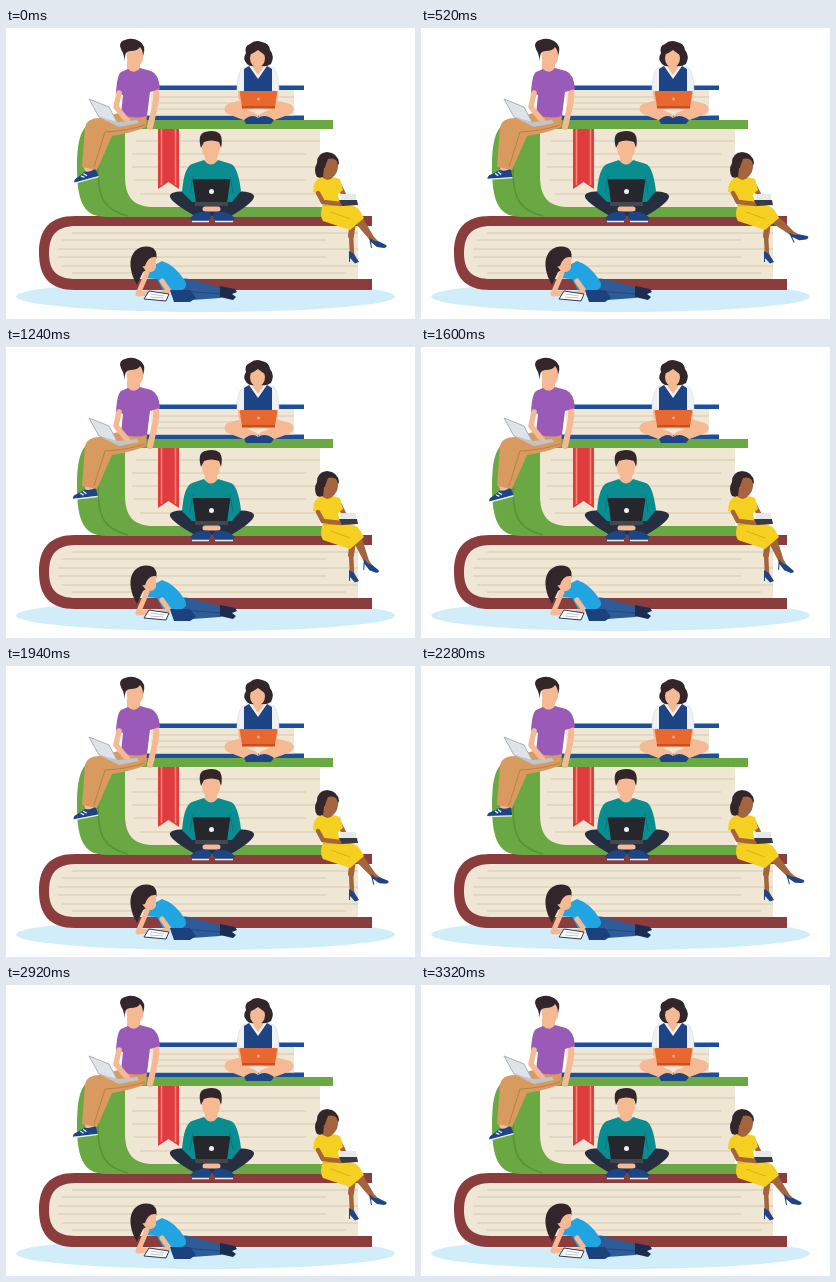
Write an HTML page that moves like this. It is 409 by 291 pixels and loops after 3340 ms.

```html
<!DOCTYPE html>
<html lang="en">
<head>
<meta charset="utf-8">
<title>Readers on a stack of books</title>
<style>
  html, body { margin: 0; width: 100%; height: 100%; overflow: hidden; background: #fff; }
  svg { display: block; width: 100vw; height: 100vh; }
  .skin { fill: #f5b994; }
  .hair { fill: #33262a; }
  .page { fill: #f0e6d4; }
  .rule { stroke: #ddd2bd; stroke-width: 1.6; fill: none; }
  .navy { fill: #1d4484; }
  .limb { fill: none; stroke-linecap: round; stroke-linejoin: round; }
  .light { stroke: #f5b994; }
  .brown { stroke: #a4643d; }
</style>
</head>
<body>
<svg viewBox="0 0 409 291">
  <ellipse cx="199.500" cy="268.500" rx="189.500" ry="15.500" fill="#d1edfa"/>

  <g id="bottom-book">
    <path fill="#8a3d3c" d="M366 188H69C44 188 33 201 33 225S44 262 69 262H366V251H340V198H366Z"/>
    <path class="page" d="M352 198H70C51 198 43 207 43 225S51 251 70 251H352Z"/>
    <path class="rule" d="M66 205H352M56 212H320M52 221H352M52 229H320M56 238H352M66 245H340"/>
  </g>

  <g id="middle-book">
    <path fill="#69a842" d="M327 92H98C78 92 71 104 71 140S79 189 101 189H327V179H300V101H327Z"/>
    <path fill="none" stroke="#579237" stroke-width="1.500" d="M108 94C96 97 92 108 92 140S99 182 122 188"/>
    <path class="page" d="M314 101H121Q119 102 119 106V148C119 169 127 179 148 179H314Z"/>
    <path class="rule" d="M130 113H314M126 126H300M126 139H314M128 152H300M134 166H314"/>
    <path fill="#e03c40" d="M152 101H173V161L162.500 154 152 161Z"/>
    <path stroke="#f28a72" stroke-width="1.500" d="M155.500 101V157M169.500 101V157"/>
  </g>

  <g id="top-book">
    <path fill="#1d4f98" d="M150 57.500H298V62H150ZM138 87.500H298V92H138Z"/>
    <path class="page" d="M145 62H288V87.500H145Z"/>
    <path class="rule" d="M152 69H288M152 75H276M152 81H288"/>
  </g>

  <g id="man-left">
    <path class="limb light" stroke-width="6" d="M150 58Q151 72 148 82L144 99"/>
    <g id="shoe">
      <path class="skin" d="M79 137H89L88 144 80 145Z"/>
      <path class="navy" d="M79 141.500Q85 144 90 140.500L91 149.500H66Q66 146 71 145Z"/>
      <path stroke="#e9eef5" stroke-width="1.300" d="M66 150H91M74 144.500L77 147M77 143L80 146"/>
    </g>
    <path fill="#d99a60" d="M141 87L140 99Q126 105 106 108L91 142 76 139 79 99Q81 90 94 90L116 84Z"/>
    <path fill="none" stroke="#bd7e48" d="M139 97Q121 103 99 104L88 139"/>
    <path class="skin" d="M121 33H134V44Q127 50 121 43Z"/>
    <path fill="#9a5bb8" d="M122 41Q128 47 134 40L145 43Q153 46 154 61L144 64 141 88Q128 92 115 86L117 67 110 65Q111 47 115 44Z"/>
    <path class="limb light" stroke-width="5.500" d="M113 65L110 79 119 90"/>
    <ellipse class="skin" cx="129" cy="27" rx="8.500" ry="12"/>
    <path class="hair" d="M119 33Q118 23 124 23 132 23 134 19 137 22 137 28 141 17 133 13 126 9 119 12 114 13 114 18 115 22 117 25Z"/>
    <path fill="#dfe3e8" stroke="#a9b0ba" d="M83 71L103 79 112 96 93 89Z"/>
    <path fill="#bfc5cd" d="M93 89L112 94 131 92 133 95 113 99Z"/>
    <path class="limb light" stroke-width="4" d="M117 89L122 92"/>
  </g>

  <g id="woman-top">
    <path class="limb light" stroke-width="11" d="M245 75L224 81 247 90M259 75L282 81 258 90"/>
    <path class="limb light" stroke-width="5" d="M234 58L235 70M270 58L269 70"/>
    <path class="navy" d="M238 92Q246 85 252 90 259 85 268 92L265 96H240Z"/>
    <path fill="#eef1f6" stroke="#d5dbe4" stroke-width=".6" d="M246 37H258L268 40Q273 46 273 63H264V72H240V63H231Q231 45 237 40Z"/>
    <path class="navy" d="M243 38L252 51 261 38 266 41V66H238V41Z"/>
    <path class="skin" d="M247 34H257V40L252 47 247 40Z"/>
    <path class="hair" d="M241 36Q236 31 240 25 238 18 244 16 249 11 256 14 263 15 264 22 269 28 265 36 259 40 252 37 245 40 241 36Z"/>
    <ellipse class="skin" cx="251.500" cy="30" rx="7.500" ry="9.500"/>
    <path class="hair" d="M243 27Q244 18 252 18 260 19 260 28 256 25 252 22 248 25 243 27Z"/>
    <path fill="#e9682f" d="M235 63H270Q272 63 271 66L269 79H236L234 66Q233 63 235 63Z"/>
    <path fill="#c94e20" d="M236 78H269V80.500H236Z"/>
    <circle cx="252.500" cy="71" r="1.500" fill="#f7a47d"/>
  </g>

  <g id="man-middle">
    <path fill="#262e40" d="M184 163Q162 163 164 169 166 175 189 188H225Q247 175 248 169 249 163 226 163Z"/>
    <path class="skin" d="M199 126H211V138L205 143 199 138Z"/>
    <path fill="#098d91" d="M198 132Q205 141 212 132L225 136Q232 139 235 163L226 174H186L176 164Q178 139 186 136Z"/>
    <path fill="none" stroke="#06767c" d="M187 148L184 165M224 148L227 165"/>
    <ellipse class="skin" cx="205" cy="120" rx="9" ry="12.500"/>
    <path class="hair" d="M195 120Q191 106 199 104 209 101 214 106 217 111 215 120L213 114Q205 111 198 114Z"/>
    <path class="limb light" stroke-width="5" d="M199 181L212 181"/>
    <path fill="#26272c" d="M188 151H222Q225 151 224 154L221 175H190L187 154Q186 151 188 151Z"/>
    <path fill="#45474f" d="M189 174H222V178H189Z"/>
    <circle cx="205.500" cy="163.500" r="2.500" fill="#f1f1f1"/>
    <path class="navy" d="M184 190Q192 182 203 184L206 188 202 193H187ZM229 190Q220 182 209 184L206 188 210 193H226Z"/>
    <path stroke="#e9eef5" stroke-width="1.300" d="M186 193.500H203M209 193.500H227"/>
  </g>

  <g id="woman-right">
    <path class="limb brown" stroke-width="6" d="M347 194L345 208"/>
    <path class="limb brown" stroke-width="4.500" d="M345 206L346 227"/>
    <path class="navy" d="M343 223L348 226 353 234 349 235.500 344 230V234H343Z"/>
    <g id="leg">
      <path fill="#a4643d" d="M345 184Q350 180 355 187L368 209 374 215 369 216 363 211 350 196Z"/>
      <path class="navy" d="M363 209Q368 214 372 213L380 217Q382 219 378 220L371 219 365 214 366 220H365Z"/>
    </g>
    <path class="hair" d="M311 149Q307 142 311 135 311 125 321 124 332 125 333 135L328 148 321 152Z"/>
    <path fill="#a4643d" d="M318 140H327V151L322 155 317 150ZM322 131Q331 129 332 137 332 146 327 148 320 147 319 139Z"/>
    <path class="limb brown" stroke-width="5" d="M333 157L339 169M311 160L317 174 337 175"/>
    <path fill="#f6d021" d="M316 149Q322 155 327 149L334 151 337 162 332 166 334 176Q350 176 354 183L358 190 344 202 317 193Q313 187 317 176L314 166 307 164Q307 151 316 149Z"/>
    <path fill="none" stroke="#dbb011" d="M317 178L333 177M325 184L344 191"/>
    <path class="limb brown" stroke-width="4.500" d="M312 165L317 174 335 176"/>
    <path fill="#e6e8ea" d="M334 166H350V173H335Z"/>
    <path fill="#383b43" d="M333 172H351L352 177 336 178Z"/>
  </g>

  <g id="woman-lying">
    <path fill="#2d5c98" d="M166 254Q178 248 187 252L217 260 223 267 214 270 172 273Q162 270 166 254Z"/>
    <path fill="none" stroke="#21477d" d="M176 263L216 266"/>
    <path fill="#1c2c4f" d="M214 258L229 261 231 264 226 266 230 269 227 272 214 269Z"/>
    <path class="hair" d="M127 249Q121 232 129 223 137 216 147 220 153 225 149 234L144 240 137 244 131 257Z"/>
    <path fill="#21a4e2" d="M143 240L156 233Q169 237 179 253 183 260 174 263L157 262 151 251 138 250Z"/>
    <path class="skin" d="M137 230Q146 222 150 229L150 240Q147 246 140 243L136 238Z"/>
    <path class="hair" d="M134 239Q134 222 145 221 151 222 150 229 142 228 139 238Z"/>
    <path class="limb light" stroke-width="5" d="M141 245L132 266 143 265M156 253L163 263 154 266"/>
    <path fill="#fff" stroke="#303a50" d="M143 263L163 266 160 273 138 271Z"/>
    <path stroke="#aeb6c2" stroke-width=".8" d="M145 266L158 268M144 269L157 270"/>
    <path fill="#1c417d" d="M164 262H184L190 270 184 274H168Z"/>
  </g>
</svg>
<script>
const LOOP = 3340;
const shoe = document.getElementById("shoe");
const leg = document.getElementById("leg");

// [time in ms, leg angle in degrees]
const swing = [[0, 0], [540, -15], [700, -15], [1420, 18], [2050, -6], [2180, -6], [2700, 0], [LOOP, 0]];

const ease = p => (1 - Math.cos(Math.PI * p)) / 2;

function legAngle(t) {
  const i = swing.findIndex(key => key[0] > t);
  const [t0, a0] = swing[i - 1], [t1, a1] = swing[i];
  return a0 + (a1 - a0) * ease((t - t0) / (t1 - t0));
}

function draw(now) {
  const t = Math.floor(now % LOOP / 20) * 20;
  const tilt = -7 - 8 * Math.cos(4 * Math.PI * t / LOOP);
  shoe.setAttribute("transform", `rotate(${tilt} 87 143)`);
  leg.setAttribute("transform", `rotate(${legAngle(t)} 349 188)`);
  requestAnimationFrame(draw);
}
draw(performance.now());
</script>
</body>
</html>
```
